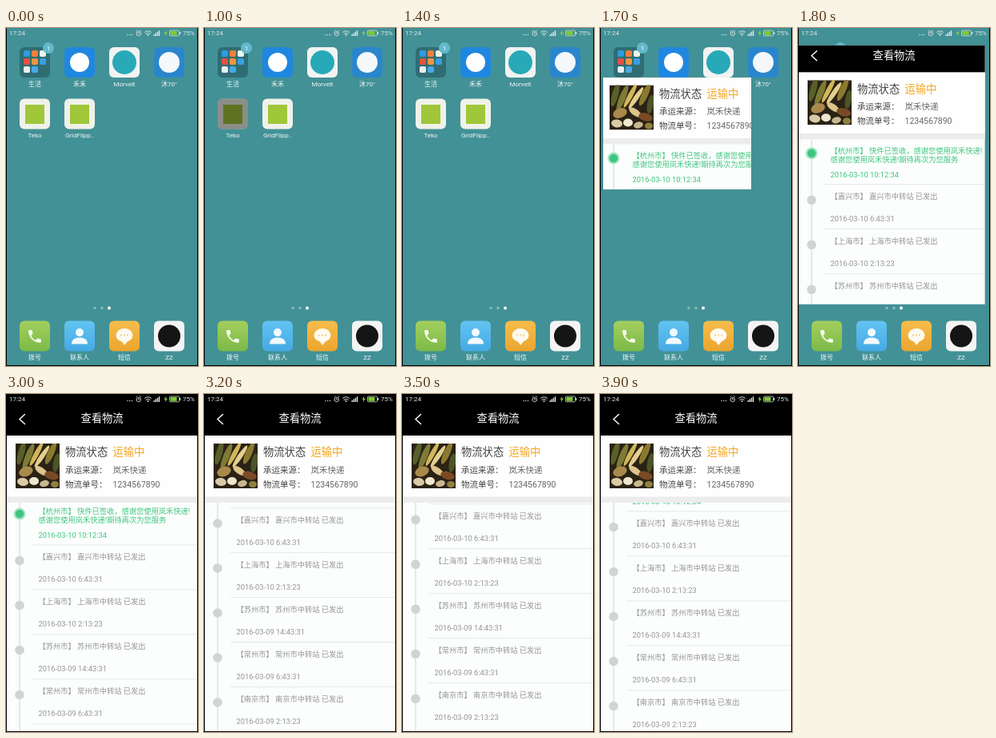
An HTML page that plays this animation: 240x423 px, repeating every 4000 ms.

```html
<!DOCTYPE html>
<html lang="zh-CN">
<head>
<meta charset="utf-8">
<style>
html, body { margin: 0; height: 100%; overflow: hidden; background: #000; }
svg { display: block; width: 100vw; height: 100vh; font-family: Roboto, "Noto Sans CJK SC", "Noto Sans CJK", sans-serif; }
</style>
</head>
<body>
<svg id="stage" viewBox="0 0 240 423"></svg>
<script>
const LOOP = 4000, STEP = 100;
const GREEN = '#3fc57f';

const rect = (x, y, w, h, fill, r = 0) =>
  `<rect x="${x}" y="${y}" width="${w}" height="${h}" rx="${r}" fill="${fill}"/>`;
const circle = (x, y, r, fill) => `<circle cx="${x}" cy="${y}" r="${r}" fill="${fill}"/>`;
const stroke = (d, color, w = 1) =>
  `<path d="${d}" fill="none" stroke="${color}" stroke-width="${w}" stroke-linecap="round"/>`;
const text = (x, y, size, str, fill, anchor = 'start') =>
  `<text x="${x}" y="${y}" font-size="${size}" fill="${fill}" text-anchor="${anchor}">${str}</text>`;
const oval = (x, y, rx, ry, turn, fill) =>
  `<ellipse rx="${rx}" ry="${ry}" fill="${fill}" transform="translate(${x} ${y}) rotate(${turn})"/>`;

// Launcher icon: cx is the centre, y the top of the tile
const icon = (cx, y, fill, label, art) =>
  rect(cx - 19, y, 38, 38, fill, 6) + art + text(cx, y + 48.7, 8, label, '#f2f8f8', 'middle');

function folderArt() {
  const colors = ['#2f9be0', '#f07f3c', '#e9f4ea', '#e4523f', '#f2953f', '#3a9fe0', '#e8eef0', '#4aa8e4'];
  return colors.map((c, i) => rect(22 + i % 3 * 10, 28 + Math.floor(i / 3) * 10, 8, 8, c, 2)).join('')
    + circle(53, 25, 7, '#62b9cc') + text(53, 28, 8, '1', '#fff', 'middle');
}

const handset = `<path transform="translate(25.5 375.5) scale(.87)" fill="#f7fbf0" d="M6.6 10.8
  c1.4 2.8 3.8 5.1 6.6 6.6l2.2-2.2c.3-.3.7-.4 1-.2 1.1.4 2.3.6 3.6.6.6 0 1 .4 1 1V20c0 .6-.4 1-1 1
  -9.4 0-17-7.6-17-17 0-.6.4-1 1-1h3.5c.6 0 1 .4 1 1 0 1.3.2 2.5.6 3.6.1.4 0 .7-.3 1z"/>`;
const person = circle(92, 381, 5, '#f2faff')
  + '<path d="M82 395.5c0-5.500 4-8 10-8s10 2.500 10 8z" fill="#f2faff"/>';
const bubble = oval(148, 384.5, 10.5, 8.5, 0, '#fffaf0')
  + '<path d="M144 391l4 6 5-6z" fill="#fffaf0"/>'
  + [144, 148, 152].map(x => circle(x, 384.5, 1, '#f0c878')).join('');

const home = rect(0, 0, 240, 423, '#429196')
  + icon(36, 24, '#2f6d73', '生活', folderArt())
  + icon(92, 24, '#1f87e0', '禾禾', circle(92, 43, 12, '#fff'))
  + icon(148, 24, '#f1f3f1', 'Morvelt', circle(148, 43, 15, '#27a9b8'))
  + icon(204, 24, '#2a86cc', '沐70°', circle(204, 43, 13, '#f4f8fa'))
  + icon(36, 88.5, '#f0f2ea', 'Teko', rect(24, 96, 24, 24, '#a0c63a'))
  + '<rect id="press" x="17" y="88.500" width="38" height="38" rx="6" fill="#000" opacity=".42"/>'
  + icon(92, 88.5, '#f0f2ea', 'GridFlipp..', rect(80, 96, 24, 24, '#a0c63a'))
  + circle(111, 350.5, 1.8, '#85b9bc') + circle(120, 350.5, 1.8, '#85b9bc') + circle(129, 350.5, 2, '#fff')
  + icon(36, 366.5, 'url(#lime)', '拨号', handset)
  + icon(92, 366.5, 'url(#sky)', '联系人', person)
  + icon(148, 366.5, 'url(#amber)', '短信', bubble)
  + icon(204, 366.5, '#f3f4f3', 'ZZ', circle(204, 385.5, 14, '#151515'));

const photo = `<svg x="12" y="62" width="55" height="56" viewBox="0 0 55 56">`
  + rect(0, 0, 55, 56, '#2b2216')
  + oval(7, 12, 4, 15, 15, '#58602a') + oval(16, 16, 4, 17, 22, '#7d7b35')
  + oval(26, 13, 3, 17, 28, '#d2b65a') + oval(33, 16, 3, 16, 34, '#e3d08c')
  + oval(44, 12, 4, 15, 24, '#8a7a30') + oval(51, 24, 4, 12, 10, '#4b5527')
  + oval(13, 35, 9, 6, -20, '#a98a4a') + oval(32, 34, 9, 4, 35, '#dcc48a')
  + oval(45, 40, 9, 5, 15, '#7a4a26') + oval(9, 48, 7, 5, 10, '#d8cba6')
  + oval(23, 47, 6, 5, 0, '#efe6cf') + oval(36, 50, 6, 4, -15, '#c9b88e')
  + oval(49, 51, 5, 4, 0, '#8f8040') + '</svg>';

function entry(i, city, date) {
  const dy = 56 * (i - 1);
  return rect(33, 192 + dy, 207, .8, '#e2e4e2') + circle(17, 212 + dy, 5.8, '#d2d4d3')
    + text(40.5, 210.8 + dy, 9.25, `【${city}】 ${city}中转站 已发出`, '#959595')
    + text(40.5, 238.8 + dy, 9.35, date, '#959595');
}
const stops = [['嘉兴市', '2016-03-10 6:43:31'], ['上海市', '2016-03-10 2:13:23'], ['苏州市', '2016-03-09 14:43:31'],
  ['常州市', '2016-03-09 6:43:31'], ['南京市', '2016-03-09 2:13:23']];

const list = rect(16.4, 100, 1.2, 420, '#d9dbda')
  + circle(17, 153.5, 7.5, '#a9e5c5') + circle(17, 153.5, 5.3, GREEN)
  + text(40.5, 153.5, 9.25, '【杭州市】 快件已签收，感谢您使用岚禾快递!', GREEN)
  + text(40.5, 164.2, 9.25, '感谢您使用岚禾快递!期待再次为您服务', GREEN)
  + text(40.5, 183.4, 9.35, '2016-03-10 10:12:34', GREEN)
  + stops.map(([city, date], i) => entry(i + 1, city, date)).join('');

const app = rect(0, 0, 240, 423, '#fbfefc') + `<g id="list">${list}</g>`
  + rect(0, 52, 240, 77, '#fdfefd') + rect(0, 128.5, 240, 7.5, '#ececec')
  + rect(0, -20, 240, 72, '#000') + stroke('M23.500 25.500L17 31.500L23.500 37.500', '#fff', 1.4)
  + text(120, 35.3, 13.3, '查看物流', '#fff', 'middle') + photo
  + text(74, 77.2, 13.3, '物流状态', '#444') + text(133.5, 77.2, 13.3, '运输中', '#f6a623')
  + text(74, 99, 10.5, '承运来源：', '#444') + text(133.5, 99, 10.5, '岚禾快递', '#666')
  + text(74, 116.6, 10.5, '物流单号：', '#444') + text(133.5, 116.6, 10.5, '1234567890', '#666');

const WHITE = '#e4e8e8';
const status = text(4, 9.3, 8, '17:24', WHITE)
  + [152, 154.7, 157.4].map(x => circle(x, 8.5, .7, WHITE)).join('')
  + stroke('M163 7a2.800 2.800 0 1 0 5.600 0a2.800 2.800 0 1 0 -5.600 0M165.800 5.300V7H167M163 3.600l1-.8M168.600 3.600l-1-.8', WHITE, .8)
  + stroke('M173.500 5.200q4-3 8 0M175 7.200q2.500-1.800 5 0', WHITE, 1) + circle(177.5, 9, .9, WHITE)
  + [0, 1, 2, 3].map(i => rect(184.5 + i * 2.1, 8 - i * 1.6, 1.4, 2 + i * 1.6, WHITE)).join('')
  + '<path d="M200.500 2.500l-3 4.300h2l-.8 3.700 3.200-4.700h-2z" fill="#8fd23c"/>'
  + '<rect x="204.500" y="3" width="12" height="6.800" rx="1" fill="none" stroke="#d5dcda" stroke-width=".8"/>'
  + rect(217, 5, 1.3, 2.8, '#d5dcda') + rect(205.5, 4, 8, 4.8, '#7ecb2f')
  + text(221, 9.3, 8, '75%', WHITE);

const gradient = (id, a, b) =>
  `<linearGradient id="${id}" x2="0" y2="1"><stop stop-color="${a}"/><stop offset="1" stop-color="${b}"/></linearGradient>`;

const $ = id => document.getElementById(id);
$('stage').setAttribute('preserveAspectRatio', 'none');
$('stage').innerHTML = '<defs>' + gradient('lime', '#a3cf5e', '#7cba48') + gradient('sky', '#63c4f2', '#45a9e4')
  + gradient('amber', '#f6bd4b', '#eba52e') + '<clipPath id="reveal"><rect id="window"/></clipPath></defs>'
  + home + `<g id="app" clip-path="url(#reveal)"><g id="page">${app}</g></g>` + status
  + rect(0, 0, 1, 423, '#000') + rect(239, 0, 1, 423, '#000') + rect(0, 422, 240, 1, '#000');

const mix = (a, b, p) => a + (b - a) * p;

const scrollKeys = [[2900, 0], [3000, 3.5], [3200, 50], [3400, 57], [3900, 45.5]];
function scrollAt(t) {
  const i = scrollKeys.findIndex(k => t <= k[0]);
  if (i <= 0) return 0;
  const [t0, y0] = scrollKeys[i - 1], [t1, y1] = scrollKeys[i];
  return mix(y0, y1, (t - t0) / (t1 - t0));
}

function draw(now) {
  const t = Math.floor(now % LOOP / STEP) * STEP;
  $('press').style.display = t >= 1000 && t < 1200 ? '' : 'none';
  $('app').style.display = t > 1600 ? '' : 'none';

  // The window widens faster than it grows in height
  const u = Math.min(1, Math.max(0, (t - 1600) / 300));
  const across = 1 - (1 - u) ** 3, down = u * u * (3 - 2 * u);
  const left = mix(13.5, 0, across), right = mix(68, 240, across);
  const top = mix(83.7, 0, down), bottom = mix(124.7, 423, down);
  const box = { x: left, y: top, width: right - left, height: bottom - top };
  for (const key in box) $('window').setAttribute(key, box[key]);
  $('page').setAttribute('transform', `translate(0 ${mix(12.8, 0, down)})`);
  $('list').setAttribute('transform', `translate(0 ${-scrollAt(t)})`);
}

const start = performance.now();
function tick() {
  draw(performance.now() - start);
  requestAnimationFrame(tick);
}
tick();
</script>
</body>
</html>
```
